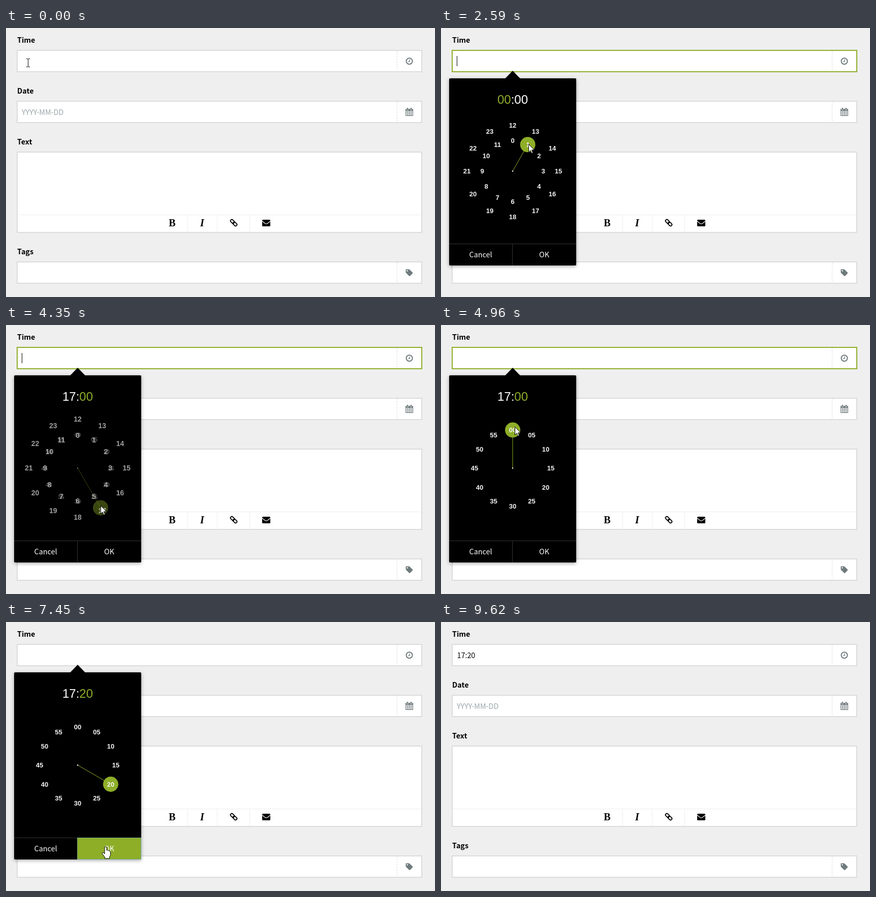
Recreate the animation shown at these times as an HTML page with a canvas. Size 844 px wide and 529 px high, loop 9700 ms.

```html
<!DOCTYPE html>
<html lang="en">
<head>
<meta charset="utf-8">
<title>Time picker</title>
<style>
html, body { margin: 0; width: 100%; height: 100%; overflow: hidden; background: #efefef; }
canvas { display: block; }
</style>
</head>
<body>
<canvas id="stage" width="844" height="529"></canvas>
<script>
const ctx = document.getElementById('stage').getContext('2d');
const LOOP = 9700, GREEN = '#8eae28', GREY = '#6f7a7d';
const SANS = '"Noto Sans CJK JP", "Noto Sans CJK SC", "Noto Sans CJK", "Open Sans", sans-serif';
const ARIAL = '"Liberation Sans", Arial, sans-serif';
const SERIF = '"Liberation Serif", "Times New Roman", serif';
const BODY = '14.33px ' + SANS;
const CX = 141, CY = 281.5;
const FIELDS = [[43, 87], [143, 187], [243, 403], [459, 503]];

// Pointer moves: start, end, number of steps, x, y, 1 = swing around the dial
const MOVES = [
  [70, 160, 2, 43, 66],
  [1580, 1960, 6, 146, 220],
  [2510, 3046, 8, 201, 297, 1],
  [3123, 3430, 5, 196, 335],
  [3500, 3500, 1, 189, 340],
  [3577, 3810, 4, 186, 355],
  [4810, 4960, 3, 145, 200],
  [5280, 5740, 7, 198, 303, 1],
  [5970, 6280, 5, 200, 314],
  [6600, 6670, 2, 199, 406],
  [6990, 7300, 5, 196, 442],
  [7830, 8070, 4, 531, 508],
  [8290, 8370, 2, 550, 540]
];
const CARET = [[940, 1410], [1960, 4580], [5130, 6600], [7145, 7450], [7530, 8070], [8610, 9070]];

const ARROW = new Path2D('M.5 .5V16.2L4 12.8L6.4 18.4L8.8 17.4L6.4 11.9H11.5Z');
const HAND = new Path2D('M-2 1Q0-1.4 2 1V7Q4 5.6 5 7.6Q7 6.6 7.6 8.6Q9.6 8 9.6 10.4V15Q9.4 18 7.6 20V23H-1.6V20.6L-6.4 14Q-7.6 11.6-5.4 11.2Q-3.8 11.2-2 14Z');
const TAG = new Path2D('M787 474.5H792.5Q793.5 474.5 794.2 475.2L799.8 480.8Q800.8 481.8 799.8 482.8L795 487.6Q794 488.6 793 487.6L787.2 481.8Q786.5 481 786.5 480V475Q786.5 474.5 787 474.5ZM789.6 476.2A1.3 1.3 0 1 0 789.6 478.8A1.3 1.3 0 1 0 789.6 476.2Z');

const lerp = (a, b, p) => a + (b - a) * p;
const within = (t, spans) => spans.some(([a, b]) => t >= a && t < b);
const angleOf = (x, y) => Math.atan2(x - CX, CY - y);
const onDial = (angle, r) => [CX + r * Math.sin(angle), CY - r * Math.cos(angle)];

function stepped(t, start, end, steps) {
  if (steps === 1) return 1;
  const k = Math.floor((t - start) / (end - start) * (steps - 1) + 0.1) + 1;
  return Math.min(1, k / steps);
}

function pointerAt(t) {
  let x = 43, y = 68;
  for (const [start, end, steps, tx, ty, swing] of MOVES) {
    if (t < start) break;
    const p = stepped(t, start, end, steps);
    if (swing) {
      const angle = lerp(angleOf(x, y), angleOf(tx, ty), p);
      const r = lerp(Math.hypot(x - CX, y - CY), Math.hypot(tx - CX, ty - CY), p);
      [x, y] = onDial(angle, r);
    } else {
      x = lerp(x, tx, p);
      y = lerp(y, ty, p);
    }
  }
  return [x, y];
}

function rect(x, y, w, h, color) {
  ctx.fillStyle = color;
  ctx.fillRect(x, y, w, h);
}

function text(str, x, y, font, color = '#000', align = 'left') {
  ctx.font = font;
  ctx.fillStyle = color;
  ctx.textAlign = align;
  ctx.fillText(str, x, y);
}

function disc(x, y, r, color) {
  ctx.fillStyle = color;
  ctx.beginPath();
  ctx.arc(x, y, r, 0, 7);
  ctx.fill();
}

function round(x, y, w, h, r) {
  ctx.beginPath();
  ctx.roundRect(x, y, w, h, r);
}

function line(points, color, width = 1) {
  ctx.strokeStyle = color;
  ctx.lineWidth = width;
  ctx.beginPath();
  points.forEach(([x, y]) => ctx.lineTo(x, y));
  ctx.stroke();
}

function field(label, [top, bottom], border = '#dcdcdc') {
  text(label, 22, top - 14, '600 ' + BODY);
  rect(21, top, 798, bottom - top, border);
  rect(23, top + 2, 794, bottom - top - 4, '#fff');
  if (bottom - top > 50) return;
  ctx.setLineDash([3, 2]);
  line([[769.5, top + 2], [769.5, bottom - 2]], '#dcdcdc');
  ctx.setLineDash([]);
}

function fieldIcons() {
  ctx.strokeStyle = GREY;
  ctx.lineWidth = 2;
  ctx.beginPath();
  ctx.arc(793.5, 65.3, 6, 0, 7);
  ctx.stroke();
  line([[794.2, 61.8], [794.2, 66.2], [790.8, 66.2]], GREY, 1.3);

  ctx.fillStyle = GREY;
  round(786, 159, 15, 14, 1);
  ctx.fill();
  for (let i = 0; i < 4; i++)
    for (let j = 0; j < 3; j++) rect(787 + i * 3.45, 163.4 + j * 3, 2.6, 2.2, '#fff');
  for (const x of [788.6, 795.6]) {
    rect(x - 0.4, 157, 3.4, 4.6, '#fff');
    rect(x + 0.1, 157, 2.4, 4, GREY);
  }

  ctx.fillStyle = GREY;
  ctx.fill(TAG, 'evenodd');
}

function toolbar() {
  rect(23, 367, 794, 1, '#eee');
  for (const x of [357, 415, 479]) rect(x, 367, 1, 34, '#eee');
  text('B', 327, 390, 'bold 20px ' + SERIF, '#000', 'center');
  text('I', 386, 390, 'italic bold 20px ' + SERIF, '#000', 'center');

  ctx.save();
  ctx.translate(448, 383);
  ctx.rotate(Math.PI / 4);
  ctx.strokeStyle = '#000';
  ctx.lineWidth = 1.8;
  for (const x of [-7.8, -0.8]) {
    round(x, -2.7, 8.6, 5.4, 2.5);
    ctx.stroke();
  }
  ctx.restore();

  ctx.fillStyle = '#000';
  round(504, 377, 16, 13, 1.6);
  ctx.fill();
  line([[504, 380], [510.5, 385], [513.5, 385], [520, 380]], '#fff', 1.2);
}

function dial(values, opacity, scale) {
  if (opacity <= 0) return;
  ctx.save();
  ctx.globalAlpha = opacity;
  ctx.translate(CX, CY);
  ctx.scale(scale, scale);
  ctx.translate(-CX, -CY);
  for (const [label, angle, r] of values) {
    const [x, y] = onDial(angle, r);
    text(label, x, y + 4.6, 'bold 13px ' + ARIAL, '#f4f4f4', 'center');
  }
  ctx.restore();
}

const HOURS = Array.from({ length: 24 }, (_, i) => [String(i), i * Math.PI / 6, i < 12 ? 60 : 90]);
const MINUTES = Array.from({ length: 12 }, (_, i) => [String(i * 5).padStart(2, '0'), i * Math.PI / 6, 75]);

function handAt(t, x, y) {
  const minutes = t >= 4425;
  if (t >= 6430) return [Math.PI * 2 / 3, 75];
  if (t >= 5280) return [angleOf(x, y), 75];
  if (minutes) return [0, 75];
  if (t >= 4270) return [Math.PI * 5 / 6, 90];
  if (t >= 2340) return [angleOf(x, y), Math.hypot(x - CX, y - CY) < 78 ? 60 : 90];
  return [0, 60];
}

function picker(t, x, y, overOk) {
  ctx.save();
  ctx.shadowColor = 'rgba(0,0,0,.35)';
  ctx.shadowBlur = 7;
  ctx.shadowOffsetY = 2;
  ctx.fillStyle = '#000';
  round(16, 99, 250, 368, 2);
  ctx.fill();
  ctx.restore();
  ctx.fillStyle = '#000';
  ctx.fill(new Path2D('M126 99.5L141 84L156 99.5Z'));

  const minuteView = t >= 4270;
  const hour = minuteView ? '17' : '00', minute = t >= 6430 ? '20' : '00';
  const font = '24px ' + ARIAL;
  text(hour, 137.7, 149, font, minuteView ? '#fff' : GREEN, 'right');
  text(':', 141, 149, font, '#fff', 'center');
  text(minute, 144.3, 149, font, minuteView ? GREEN : '#fff');

  const p = minuteView ? stepped(t, 4270, 4580, 5) : 0;
  const fade = p * p * (3 - 2 * p);
  const [angle, r] = handAt(t, x, y), [hx, hy] = onDial(angle, r);
  ctx.globalAlpha = 0.25 + 0.75 * Math.abs(1 - 2 * p);
  line([[CX, CY], [hx, hy]], GREEN);
  disc(hx, hy, 15, GREEN);
  disc(CX, CY, 1.2, '#fff');
  ctx.globalAlpha = 1;
  dial(HOURS, 1 - fade, 1 + 0.2 * fade);
  dial(MINUTES, fade, 0.8 + 0.2 * fade);

  rect(16, 424, 250, 1, '#333');
  rect(140, 424, 1, 43, '#333');
  if (overOk) rect(141, 425, 125, 42, GREEN);
  if (t >= 7450) {
    ctx.strokeStyle = '#6fa58c';
    ctx.lineWidth = 1;
    ctx.strokeRect(140.5, 424.5, 125, 42);
  }
  text('Cancel', 78, 451, BODY, '#fff', 'center');
  text('OK', 203, 451, BODY, '#fff', 'center');
}

function pointer(x, y, kind) {
  x = Math.round(x);
  y = Math.round(y);
  if (kind === 'beam') {
    rect(x, y - 7, 1, 15, '#000');
    for (const end of [y - 8, y + 8])
      for (const side of [x - 3, x + 1]) rect(side, end, 3, 1, '#000');
    return;
  }
  const shape = kind === 'hand' ? HAND : ARROW;
  ctx.save();
  ctx.translate(x, y);
  ctx.fillStyle = '#fff';
  ctx.strokeStyle = '#000';
  ctx.lineWidth = 1;
  ctx.fill(shape);
  ctx.stroke(shape);
  ctx.restore();
}

function draw(t) {
  const [x, y] = pointerAt(t);
  const open = t >= 940 && t < 7530;
  const focused = within(t, [[940, 7450], [7530, 9620]]);
  const overPicker = open && x < 266 && y > 98;
  const overOk = overPicker && x > 140 && y > 424;

  rect(0, 0, 844, 529, '#efefef');
  field('Time', FIELDS[0], focused ? GREEN : undefined);
  field('Date', FIELDS[1]);
  field('Text', FIELDS[2]);
  field('Tags', FIELDS[3]);
  text('YYYY-MM-DD', 31, 171, BODY, '#9ba6a9');
  fieldIcons();
  toolbar();

  const filled = t >= 7530;
  if (filled) text('17:20', 31.5, 71, BODY);
  if (within(t, CARET)) rect(filled ? 67 : 31, 55, 1, 20, '#000');
  if (open) picker(t, x, y, overOk);

  const overField = !overPicker && within(y, FIELDS);
  pointer(x, y, overOk ? 'hand' : overField ? 'beam' : 'arrow');
}

const begin = performance.now();
function tick() {
  draw((performance.now() - begin) % LOOP);
  requestAnimationFrame(tick);
}
tick();
</script>
</body>
</html>
```
